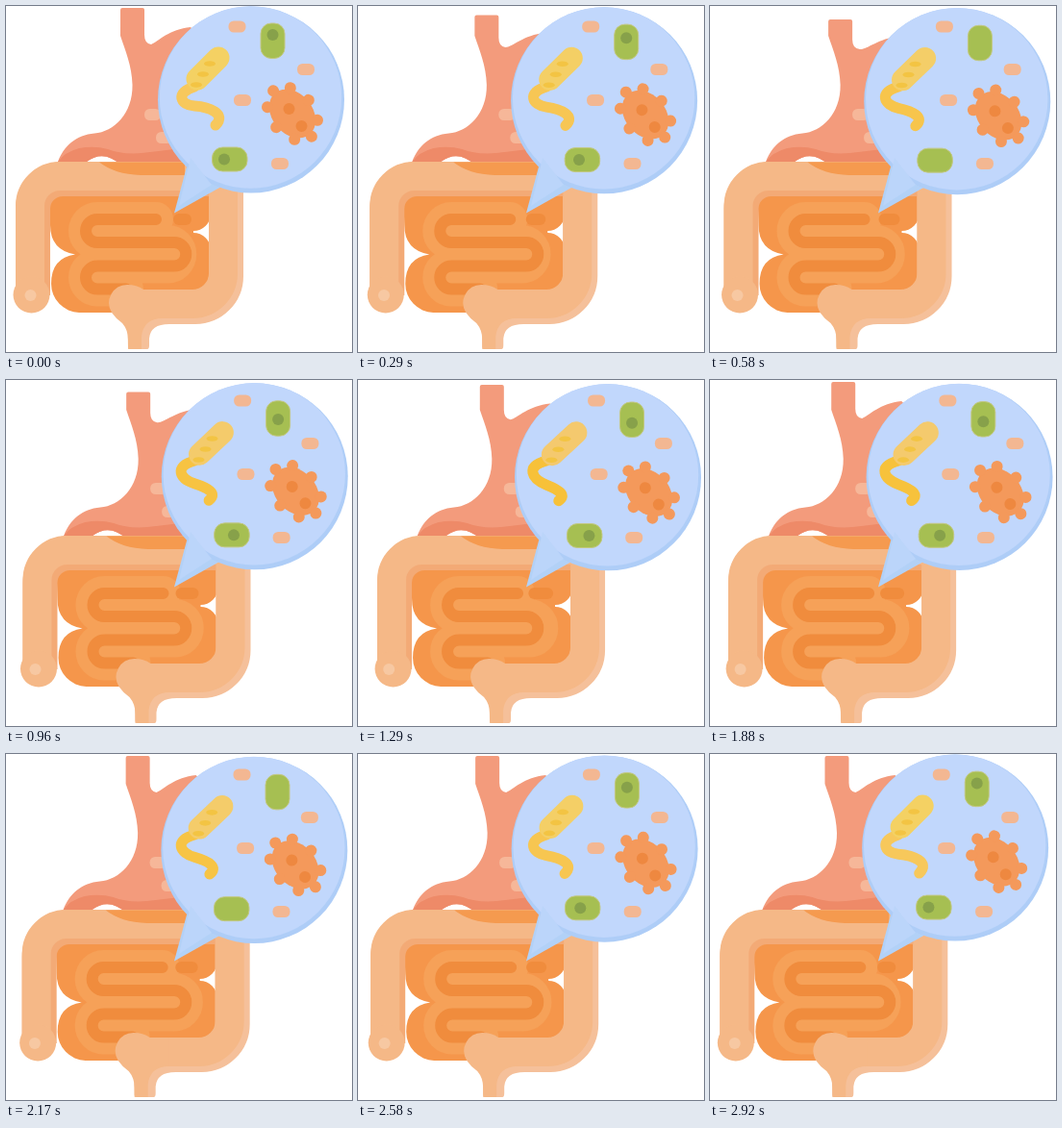
Write an HTML page that moves like this. It is 360 by 360 pixels and loops after 2.96 s.

```html
<!DOCTYPE html>
<html lang="en">
<head>
<meta charset="utf-8">
<title>Gut bacteria</title>
<style>
  html, body { margin: 0; width: 100%; height: 100%; overflow: hidden; background: #fff; }
  svg { display: block; width: 100vw; height: 100vh; }
</style>
</head>
<body>
<svg viewBox="0 0 360 360">
  <defs>
    <path id="rise" d="M28 301V211A31 31 0 0 1 59 180H229" fill="none"/>
    <path id="fall" d="M229 180V281A32 32 0 0 1 197 313H126" fill="none"/>
    <rect id="pill" x="-9" y="-6" width="18" height="12" rx="5.5" fill="#f3b792"/>
  </defs>

  <g id="stomach">
    <path id="stomachBody" fill="#f39b7c"/>
    <path fill="#ee8a68" d="M54 162Q61 152 76 148Q92 145 106 149Q124 156 150 152L200 146V166H120Q102 149 84 162Z"/>
    <rect x="144" y="107" width="17" height="12" rx="5.5" fill="#f6b799"/>
    <rect x="156" y="131" width="17" height="12" rx="5.5" fill="#f6b799"/>
  </g>

  <g id="bowel">
    <path fill="#f5964b" d="M45 194H213V216A18 18 0 0 1 195 234V236A18 18 0 0 1 213 254V319H76A30 30 0 0 1 47 289Q47 262 72 258.500Q46 254 46 228Z"/>
    <path id="coilGlow" fill="none" stroke="#f6a158" stroke-width="36" stroke-linecap="round"/>
    <path id="coil" fill="none" stroke="#f08c3d" stroke-width="12" stroke-linecap="round"/>
    <path id="dash" stroke="#f08c3d" stroke-width="12" stroke-linecap="round"/>
    <path fill="#f5c09a" d="M126 300L127 357H147Q149 357 149 353V346Q150 331 170 331V310Z"/>
    <use href="#fall" stroke="#f5c09a" stroke-width="36"/>
    <use href="#rise" stroke="#f3aa76" stroke-width="36"/>
    <g stroke="#f5b887" stroke-width="30" transform="translate(-3 -3)">
      <use href="#rise"/>
      <use href="#fall"/>
    </g>
    <path fill="#f59a4f" d="M97 162.500Q113 175 140 176H186V162.500Z"/>
    <circle cx="26.500" cy="300.500" r="19" fill="#f5b887"/>
    <circle id="bulbDot" cy="301" r="6" fill="#f7c8a2"/>
    <path fill="#f5b887" d="M126 290A19 19 0 0 0 110 319Q114 325 121 330Q127 337 127 347V355Q127 357 129 357H141V344Q143 325 163 325V295H143Q136 290 126 290Z"/>
  </g>

  <path fill="#b2d1f7" d="M190 160L175 215.500L224 188Z"/>
  <g id="bubble">
    <circle cx="255" cy="97.500" r="97" fill="#aecdf7"/>
    <circle cx="254.500" cy="95" r="94.700" fill="#c1d7fc"/>
  </g>
  <path fill="#bbd5fa" d="M192 158L180 208L214 186Z"/>

  <g id="pills"></g>
  <g fill="#a6bf52" stroke="#c3c882">
    <rect id="tallBug" width="25" height="36.500" rx="11"/>
    <rect id="wideBug" width="36.500" height="25" rx="11"/>
  </g>
  <g id="bugDots" fill="#87a14a">
    <circle id="tallDot" r="6"/>
    <circle id="wideDot" r="6"/>
  </g>
  <g id="germ" fill="#f4995b">
    <g id="germBody" transform="translate(298 112) rotate(50)">
      <ellipse rx="28" ry="21"/>
    </g>
    <g fill="#ee8840">
      <circle cx="294.500" cy="107" r="6"/>
      <circle cx="307.500" cy="125" r="6"/>
    </g>
  </g>

  <path id="tail" fill="none" stroke-width="11" stroke-linecap="round"/>
  <path id="head" fill="none" stroke-linecap="round" stroke-width="23"/>
  <g id="marks" fill="#f3c443"></g>
</svg>
<script>
const LOOP = 2960, PEAK = 1540;
const $ = id => document.getElementById(id);
const mix = (a, b, p) => a + (b - a) * p;
const set = (id, attrs) => {
  for (const name in attrs) $(id).setAttribute(name, attrs[name]);
};
const move = (id, x, y = 0) => set(id, { transform: `translate(${x} ${y})` });

function add(parent, tag, attrs) {
  const node = document.createElementNS("http://www.w3.org/2000/svg", tag);
  for (const name in attrs) node.setAttribute(name, attrs[name]);
  return $(parent).appendChild(node);
}

// Things high up in the bubble sway further sideways.
const sway = y => 10 - 0.045 * y;

const pills = [[240.5, 21.5], [312, 66], [246, 98], [285, 164]]
  .map(([x, y]) => ({ x, y, node: add("pills", "use", { href: "#pill" }) }));

for (let i = 0; i < 8; i++) {
  const a = i * Math.PI / 4;
  add("germBody", "circle", { cx: 31 * Math.cos(a), cy: 22 * Math.sin(a), r: 6 });
}
for (let i = 0; i < 3; i++)
  add("marks", "ellipse", { cx: 212 - 7 * i, cy: 60 + 11 * i, rx: 6, ry: 2.8 });

// Four rows joined by round bends; only the right bend's place varies.
const coilPath = right =>
  `M156 222H95a12 12 0 0 0 0 24H${right}a12.2 12.2 0 0 1 0 24.5H95a12 12 0 0 0 0 24H125`;
set("coilGlow", { d: coilPath(168) });

function draw(t) {
  const p = t < PEAK ? t / PEAK : (LOOP - t) / (LOOP - PEAK);

  const gulp = Math.sin(Math.PI * Math.min(1, t / 1400));
  const top = 2 + 12.5 * gulp, drop = 10 * gulp;
  move("stomach", 9 * p ** 0.8);
  set("stomachBody", { d: `M119 ${top + 2}q0-2 2-2h21q2 0 2 2V${30 + drop / 2}Q144 ${39 + drop / 2} 151 ${40 + drop / 2}
    C158 ${37 + drop} 170 ${24 + drop} 192 ${22 + drop}L200 30V166H120Q102 149 84 162H54
    C60 146 73 134 92 132.500C112 131 132 112 131.500 82C131 62 124 46 119 31Z` });

  move("bowel", 12 * p);
  set("coil", { d: coilPath(175 - 12 * p) });
  set("dash", { d: `M${180 - 8 * p} 222H187` });
  set("bulbDot", { cx: 25.5 - 4 * p });
  move("bubble", 6 * p, 4.5 * p);

  for (const { x, y, node } of pills)
    node.setAttribute("transform", `translate(${x + sway(y) * p} ${y})`);

  const tallX = 265 + 9 * p, tallY = 18 + 6 * p;
  const wideX = 214.5 + 3.5 * p, wideY = 147 + 3 * p;
  move("tallBug", tallX, tallY);
  move("wideBug", wideX, wideY);
  move("tallDot", tallX + 12.5, tallY + 12 + 11.5 * p);
  move("wideDot", wideX + 12.5 + 12.5 * p, wideY + 12.5);
  set("bugDots", { opacity: p > 0.33 && p < 0.59 ? 0 : 1 });

  set("germ", { transform: `translate(${5.5 * p} ${6 * p}) rotate(${-4 * p} 298 112)` });

  set("tail", {
    d: `M196 84C${176 - 3 * p} 90 181 103 196 ${104 + 6 * p}S${230 - 16 * p} ${112 + 10 * p} ${218 - 11 * p} ${124 + 2 * p}`,
    stroke: `rgb(247 ${mix(200, 192, p)} ${mix(92, 50, p)})`
  });
  set("head", {
    d: `M${221 + 7 * p} ${54 + p}L${199 + 4 * p} ${76 + 2 * p}`,
    stroke: `rgb(244 ${mix(209, 200, p)} ${mix(99, 112, p)})`
  });
  move("marks", 4 * p, 1.5 * p);
}

const start = performance.now();
function tick() {
  draw((performance.now() - start) % LOOP);
  requestAnimationFrame(tick);
}
tick();
</script>
</body>
</html>
```
